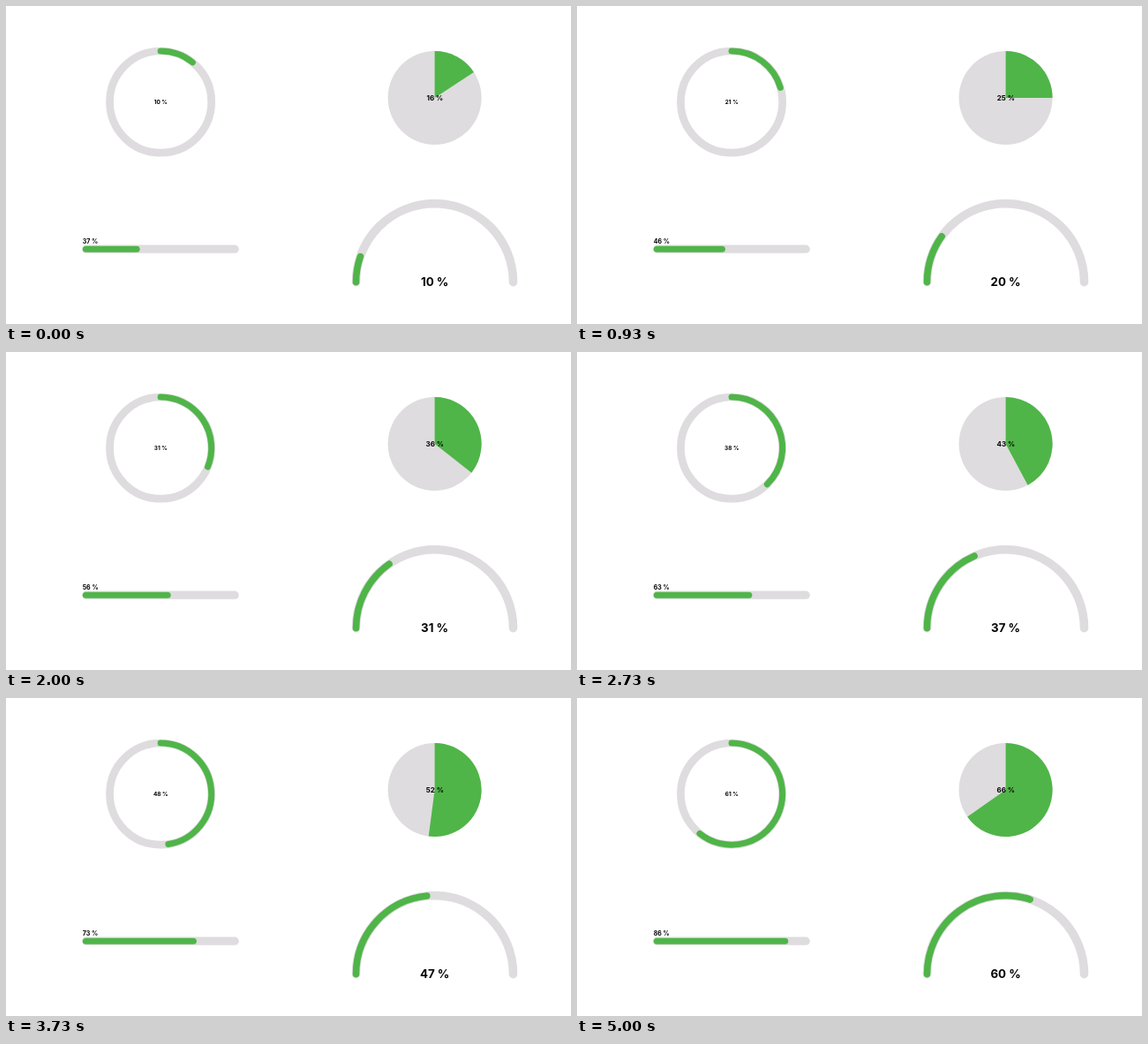
Recreate the animation shown at these times as an HTML page. Size 640x360 px, loop 5070 ms.

```html
<!DOCTYPE html>
<html lang="en">
<head>
<meta charset="utf-8">
<title>Progress indicators</title>
<style>
  html, body { margin: 0; width: 100%; height: 100%; overflow: hidden; background: #fff; }
  svg { display: block; width: 640px; height: 360px; }
  .track, .bar { fill: none; stroke-linecap: round; }
  .track { stroke: #dedcde; }
  .bar { stroke: #4fb548; }
  text { font-family: Inter, Roboto, sans-serif; font-weight: 700; fill: #050505; }
  .mid { text-anchor: middle; }
</style>
</head>
<body>
<svg viewBox="0 0 640 360">
  <circle class="track" cx="175.1" cy="108.6" r="57.6" stroke-width="8.7"/>
  <path class="bar" id="ring" stroke-width="7"/>
  <text class="mid" id="ringText" x="175.3" y="111" font-size="6.5"></text>

  <circle cx="485.6" cy="104" r="53" fill="#dedcde"/>
  <path id="pie" fill="#4fb548"/>
  <text class="mid" id="pieText" x="485.8" y="107" font-size="8"></text>

  <path class="track" d="M90.8 275.2H259.2" stroke-width="9.2"/>
  <path class="bar" id="line" stroke-width="7.1"/>
  <text id="lineText" x="86.7" y="269.1" font-size="7.1"></text>

  <path class="track" d="M396.5 312.6A89 89 0 0 1 574.5 312.6" stroke-width="9.6"/>
  <path class="bar" id="gauge" stroke-width="7.6"/>
  <text class="mid" id="gaugeText" x="485.6" y="317.4" font-size="13.3"></text>
</svg>
<script>
  const LOOP = 5070, STEP = LOOP / 76, RATE = 0.0099;
  const $ = id => document.getElementById(id);

  // Clockwise arc; angles in degrees from twelve o'clock.
  function arc(cx, cy, r, from, to) {
    const point = deg => {
      const a = deg * Math.PI / 180;
      return `${(cx + r * Math.sin(a)).toFixed(2)} ${(cy - r * Math.cos(a)).toFixed(2)}`;
    };
    return `M${point(from)}A${r} ${r} 0 ${to - from > 180 ? 1 : 0} 1 ${point(to)}`;
  }

  function show(id, path, value) {
    $(id).setAttribute('d', path);
    $(id + 'Text').textContent = Math.floor(value) + ' %';
  }

  function render(time) {
    const t = Math.floor((time + 4) / STEP) * STEP;
    const grown = t * RATE;
    const lag = Math.exp(-t / 300); // the round counters start slightly late

    show('ring', arc(175.1, 108.6, 57.6, 0, 3.6 * (11.25 + grown - 0.4 * lag)),
      12.06 + grown - 1.1 * lag);
    show('pie', arc(485.6, 104, 53, 0, 3.6 * (15.75 + grown)) + 'L485.6 104Z',
      16.6 + grown);
    show('line', `M90.4 275.2H${(83.1 + 1.77 * (36.7 + grown)).toFixed(2)}`,
      37.1 + grown);
    show('gauge', arc(485.5, 312.6, 89, -90, -90 + 1.8 * (10.55 + grown)),
      11.46 + grown - 1.1 * lag);
  }

  const start = performance.now();
  function tick() {
    render((performance.now() - start) % LOOP);
    requestAnimationFrame(tick);
  }
  tick();
</script>
</body>
</html>
```
